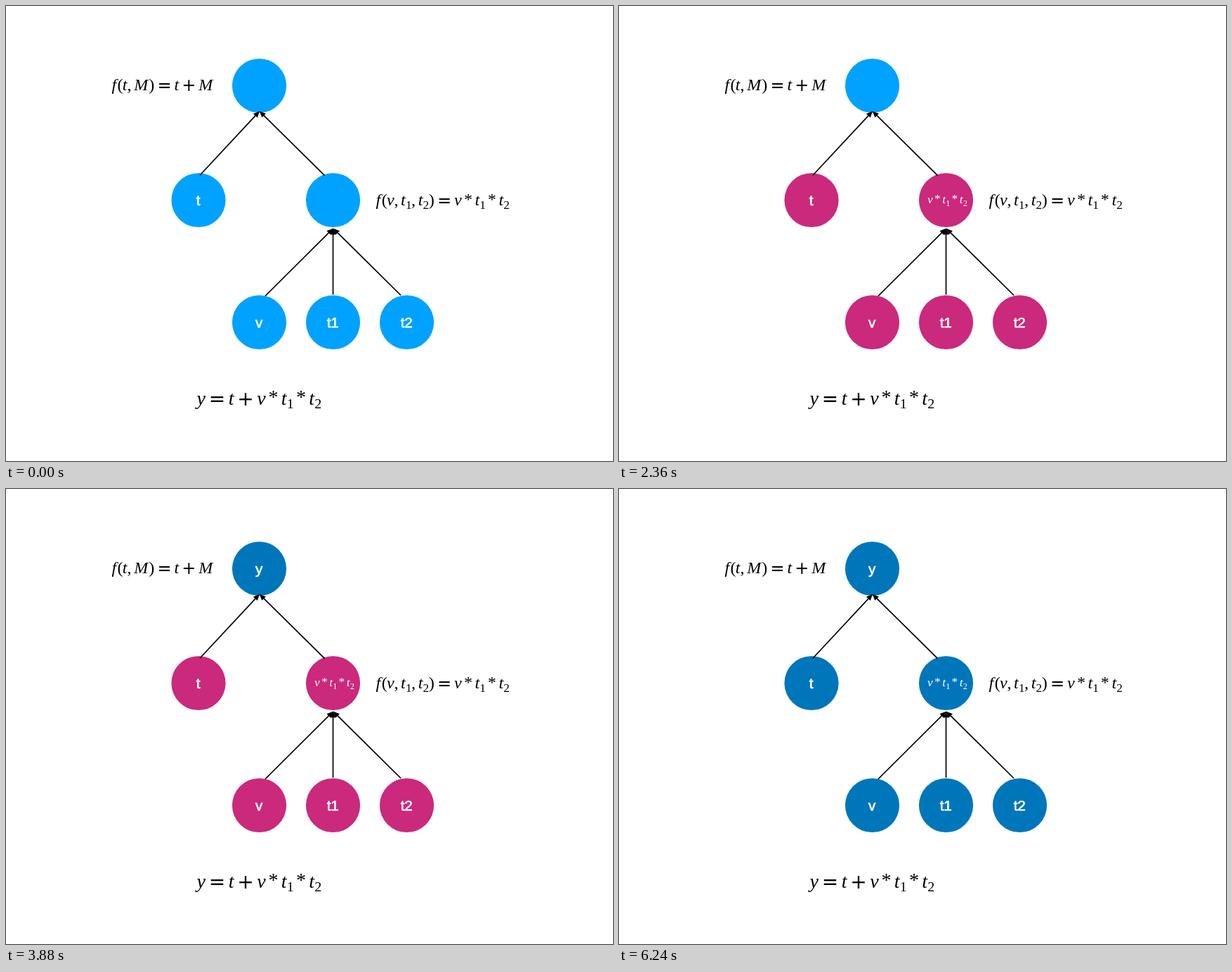
Recreate the animation shown at these times as an HTML page. Size 864x648 px, loop 7000 ms.

```html
<!DOCTYPE html>
<html lang="en">
<head>
<meta charset="utf-8">
<title>Expression tree</title>
<style>
  html, body { margin: 0; width: 100%; height: 100%; overflow: hidden; background: #fff; }
  svg { display: block; width: 100vw; height: 100vh; }
  .math { font-family: "Liberation Serif", serif; }
  .relation { font-family: "DejaVu Sans", sans-serif; }
  .label {
    font: 20.5px "Liberation Sans", sans-serif;
    text-anchor: middle; fill: #fff; stroke: #fff; stroke-width: .7;
  }
</style>
</head>
<body>
<svg id="stage" viewBox="0 0 864 648"></svg>
<script>
const LOOP = 7000;
const STARTS = [0, 800, 1560, 2360, 3120, 3880, 4680, 5440, 6240];
const BLUE = '#00a2ff', PINK = '#cb297b', GREEN = '#1db100', DARK = '#0076ba';
const stage = document.getElementById('stage');

// Horizontal advance of each math glyph, in em.
const ADVANCE = {
  f: .34, '(': .3, ')': .35, t: .285, v: .44, y: .46, M: .88, '∂': .5,
  ',': .4, '=': .63, '+': .63, '*': .51, 1: .34, 2: .34
};
const isRelation = c => c === '=' || c === '+';
const gap = c => isRelation(c) ? .265 : c === '*' ? .14 : 0;
const mathWidth = s => [...s].reduce((w, c) => w + ADVANCE[c] + 2 * gap(c), 0);

function math(s, x, y, size = 24, fill = '#000') {
  let out = '';
  for (const c of s) {
    x += gap(c) * size;
    let scale = 1, dx = 0, dy = 0, name = '';
    if (isRelation(c)) { dx = -.106; dy = .055; name = 'relation'; }
    else if (c === '*') dy = -.06;
    else if (/\d/.test(c)) { scale = .71; dy = .21; }
    const style = /[a-zA-Z∂]/.test(c) ? 'italic' : 'normal';
    out += `<text class="${name}" x="${x + dx * size}" y="${y + dy * size}" font-size="${size * scale}" font-style="${style}">${c}</text>`;
    x += (ADVANCE[c] + gap(c)) * size;
  }
  return `<g class="math" fill="${fill}">${out}</g>`;
}

function partial(variable, cx, barY) {
  const den = '∂' + variable;
  const half = mathWidth(den) * 12;
  return math('∂f', cx - 9.5, barY - 8) +
    `<path d="M${cx - half - 1.5} ${barY}h${2 * half + 3}" stroke="#000" stroke-width="1.3"/>` +
    math(den, cx - half, barY + 24.3);
}

function node(x, y, fill, text = '') {
  return `<circle cx="${x}" cy="${y}" r="38.6" fill="${fill}"/>` +
    (text && `<text class="label" x="${x - .3}" y="${y + 7.7}">${text}</text>`);
}

function arrow(x1, y1, x2, y2) {
  const angle = Math.atan2(y2 - y1, x2 - x1) * 180 / Math.PI;
  const length = Math.hypot(x2 - x1, y2 - y1);
  return `<g transform="translate(${x1} ${y1}) rotate(${angle})">` +
    `<path d="M0 0H${length - 7}" stroke="#000" stroke-width="1.7"/>` +
    `<path d="M${length} 0l-9 -4v8z"/></g>`;
}

const formulas =
  math('f(t,M)=t+M', 150.4, 120) +
  math('f(v,t1,t2)=v*t1*t2', 526.6, 284) +
  math('y=t+v*t1*t2', 271.4, 567.5, 28);

const arrows =
  arrow(276, 241, 361, 149.7) +
  arrow(453.5, 241.3, 360.7, 149.7) +
  arrow(369, 413, 465.7, 316.7) +
  arrow(465.5, 411, 465.5, 316.5) +
  arrow(562, 412, 465.7, 316.7);

const upperPartials = partial('t', 288, 190.5) + partial('M', 438, 190.5);
const lowerPartials = partial('v', 383, 364) + partial('t1', 447, 381) + partial('t2', 550.5, 362);

function scene(step) {
  const top = step < 4 ? BLUE : step < 5 ? GREEN : DARK;
  const middle = step < 2 ? BLUE : step < 3 ? GREEN : step < 7 ? PINK : DARK;
  const left = step < 1 ? BLUE : step < 7 ? PINK : DARK;
  const leaf = step < 1 ? BLUE : step < 8 ? PINK : DARK;
  return formulas +
    node(360.5, 113.5, top, step >= 5 ? 'y' : '') +
    node(274, 276.5, left, 't') +
    node(465.5, 276.5, middle) +
    (step >= 3 ? math('v*t1*t2', 439, 281, 17.3, '#fff') : '') +
    ['v', 't1', 't2'].map((s, i) => node(360.5 + 105 * i, 450.5, leaf, s)).join('') +
    arrows +
    (step === 6 ? upperPartials : step === 7 ? lowerPartials : '');
}

let shown = -1;
function draw(time) {
  const t = time % LOOP;
  const step = STARTS.filter(start => start <= t).length - 1;
  if (step !== shown) stage.innerHTML = scene(shown = step);
}

const begin = performance.now();
function tick() {
  draw(performance.now() - begin);
  requestAnimationFrame(tick);
}
tick();
</script>
</body>
</html>
```
